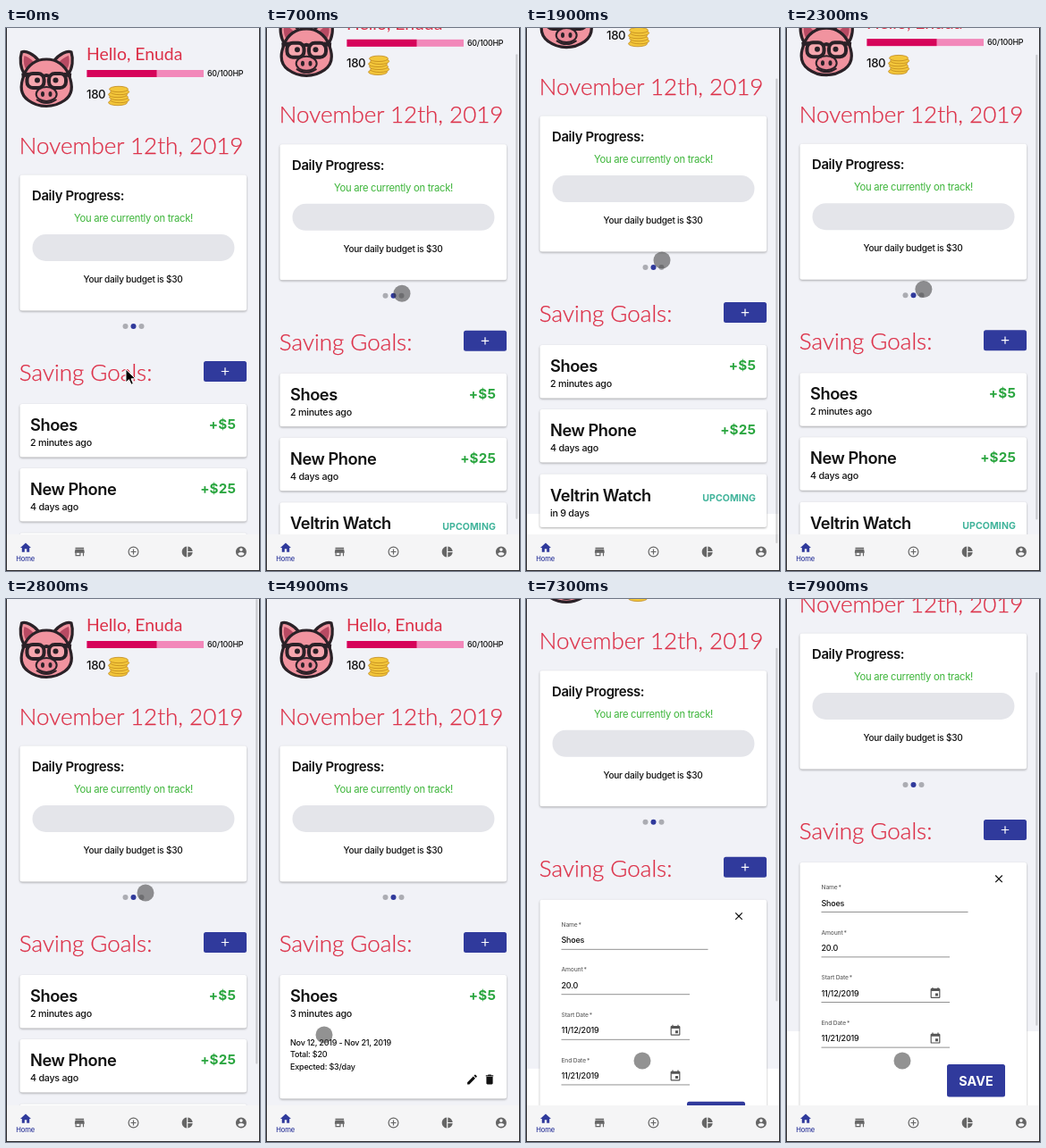
These frames come from a looping animation (284 px wide and 608 px high, 8000 ms). An HTML page:

```html
<!DOCTYPE html>
<html lang="en">
<head>
<meta charset="utf-8">
<title>Savings app</title>
<style>
  html, body { margin: 0; width: 284px; height: 608px; overflow: hidden; background: #fff; }
  svg { display: block; font-weight: 500; }
  text { font-family: Inter, Roboto, sans-serif; letter-spacing: -.025em; white-space: pre; }
  .lato { font-family: Lato, sans-serif; font-weight: 400; letter-spacing: 0; }
  .title { font-weight: 300; stroke: #dc3048; stroke-width: .25px; }
  .wide { letter-spacing: .01em; }
  .card { fill: #fff; filter: drop-shadow(0 1px 1px rgba(0, 0, 0, .32)); }
</style>
</head>
<body>
<svg id="stage" width="284" height="608" viewBox="0 0 284 608"></svg>
<script>
const INK = '#111', RED = '#dc3048', BLUE = '#303a9c', GREEN = '#2ba640', DARK = '#2a2127', PINK = '#f1939f';

const ICONS = {
  home: 'M10 20v-6h4v6h5v-8h3L12 3 2 12h3v8z',
  store: 'M20 4H4v2h16V4zm1 10v-2l-1-5H4l-1 5v2h1v6h10v-6h4v6h2v-6h1zm-9 4H6v-4h6v4z',
  addCircle: 'M13 7h-2v4H7v2h4v4h2v-4h4v-2h-4V7zm-1-5a10 10 0 1 0 0 20 10 10 0 0 0 0-20zm0 18a8 8 0 1 1 0-16 8 8 0 0 1 0 16z',
  pie: 'M11 2v20c-5.07-.5-9-4.79-9-10s3.93-9.5 9-10zm2.03 0v8.99H22c-.47-4.74-4.24-8.52-8.97-8.99zm0 11.01V22c4.74-.47 8.5-4.25 8.97-8.99z',
  person: 'M12 2a10 10 0 1 0 0 20 10 10 0 0 0 0-20zm0 3a3 3 0 1 1 0 6 3 3 0 0 1 0-6zm0 14.2c-2.5 0-4.71-1.28-6-3.22.03-1.99 4-3.08 6-3.08s5.97 1.09 6 3.08a7.2 7.2 0 0 1-6 3.22z',
  edit: 'M3 17.25V21h3.75L17.81 9.94l-3.75-3.75zM20.71 7.04a1 1 0 0 0 0-1.41l-2.34-2.34a1 1 0 0 0-1.41 0l-1.83 1.83 3.75 3.75z',
  trash: 'M6 19c0 1.1.9 2 2 2h8c1.1 0 2-.9 2-2V7H6zM19 4h-3.5l-1-1h-5l-1 1H5v2h14z',
  close: 'M19 6.41L17.59 5 12 10.59 6.41 5 5 6.41 10.59 12 5 17.59 6.41 19 12 13.41 17.59 19 19 17.59 13.41 12z',
  calendar: 'M17 12h-5v5h5zM16 1v2H8V1H6v2H5a2 2 0 0 0-2 2v14a2 2 0 0 0 2 2h14a2 2 0 0 0 2-2V5a2 2 0 0 0-2-2h-1V1zm3 18H5V8h14z',
  plus: 'M19 13h-6v6h-2v-6H5v-2h6V5h2v6h6z'
};

const text = (x, y, size, str, fill = INK, attrs = '') =>
  `<text x="${x}" y="${y}" font-size="${size}" fill="${fill}" ${attrs}>${str}</text>`;
const rect = (x, y, w, h, fill, attrs = '') =>
  `<rect x="${x}" y="${y}" width="${w}" height="${h}" fill="${fill}" ${attrs}/>`;
const icon = (name, cx, cy, fill, scale = .6) =>
  `<path d="${ICONS[name]}" fill="${fill}" transform="translate(${cx} ${cy}) scale(${scale}) translate(-12 -12)"/>`;
const card = (y, h, attrs = '') => `<rect class="card" x="15.5" y="${y}" width="253.5" height="${h}" rx="2.5" ${attrs}/>`;
const title = (y, str) => text(14.8, y, 26, str, RED, 'class="lato title"');
const MID = 'text-anchor="middle"', END = 'text-anchor="end"', BOLD = 'font-weight="600"';

function pig() {
  const both = s => s + `<g transform="translate(90.5) scale(-1 1)">${s}</g>`;
  const ear = `<path d="M37 37C31 29 22 25 17.5 27C15 35 16 45 21 52Z" fill="${PINK}" stroke="${DARK}" stroke-width="3.2"/>
    <path d="M20.5 31C19 37 20 43 23 47L31 38C27 34 24 32 20.5 31Z" fill="#b84a63"/>`;
  const side = `<rect x="23.5" y="51" width="19" height="16" rx="6.5" fill="#f5a6ae" stroke="${DARK}" stroke-width="4"/>
    <path d="M17.5 53L26 52" stroke="${DARK}" stroke-width="4.5"/>
    <circle cx="35" cy="58.5" r="3" fill="${DARK}"/>
    <ellipse cx="41" cy="74" rx="2" ry="3" fill="${DARK}"/>`;
  return both(ear) +
    `<path d="M45.2 35C33 35 24 42 20.5 52C15 65 16.5 75 25 81C31 85.5 38 87.5 45.2 87.5S59 85.5 65.5 81C74 75 75.5 65 70 52C66 42 57 35 45.2 35Z" fill="${PINK}" stroke="${DARK}" stroke-width="3.2"/>
    <path d="M34 80Q45.2 88 56.5 80" fill="#b84a63" stroke="${DARK}" stroke-width="2"/>
    <path d="M41 55Q45.2 51 49.5 55" fill="none" stroke="${DARK}" stroke-width="4"/>
    <ellipse cx="45.2" cy="74" rx="11.5" ry="8" fill="#e98796" stroke="${DARK}" stroke-width="2"/>` + both(side);
}

const coins = () => Array.from({ length: 6 }, (_, i) =>
  `<ellipse cx="${126 + [-1, 1.2, 0][i % 3]}" cy="${83.5 - i * 3}" rx="10.5" ry="3.2" fill="#f3c63a" stroke="#c08a1c" stroke-width=".8"/>`).join('');

const goal = (y, name, when, amount) => card(y, 59.5) +
  text(27, y + 30, 18.3, name, INK, BOLD) + text(27, y + 47, 10.75, when) + amount;
const gain = (y, str) => text(257, y, 15.2, str, GREEN, `class="wide" font-weight="700" ${END}`);

const field = (y, label, value, right, date) =>
  text(39.5, y, 6.7, label + '\u2009*', '#666') + text(39.5, y + 18.5, 9, value) +
  rect(39.5, y + 25, right - 39.5, .8, '#777') + (date ? icon('calendar', 167, y + 15.5, '#555') : '');

document.getElementById('stage').innerHTML = `
<g id="page">
  ${rect(0, -20, 284, 630, '#f1f2f7')}
  ${pig()}
  ${text(90, 36, 19.4, 'Hello, Enuda', RED, 'class="lato"')}
  ${rect(90.5, 47, 130.5, 8, '#f288ba')}${rect(90.5, 47, 78, 8, '#d6045a')}
  ${text(225, 54.3, 8.9, '60/100HP')}
  ${text(90, 78.5, 13.2, '180')}
  ${coins()}
  ${title(140.5, 'November 12th, 2019')}
  ${card(164.5, 152)}
  ${text(29, 193, 14.9, 'Daily Progress:', INK, BOLD)}
  ${text(142.5, 217.3, 11.25, 'You are currently on track!', '#3db53a', `font-weight="400" ${MID}`)}
  ${rect(29.5, 231, 226, 30, '#e4e5ea', 'rx="15"')}
  ${text(142, 285, 10.05, 'Your daily budget is $30', INK, MID)}
  ${[133.5, 142.5, 151.5].map((x, i) => `<circle cx="${x}" cy="334" r="3" fill="${i == 1 ? BLUE : '#abacb2'}"/>`).join('')}
  ${title(395, 'Saving Goals:')}
  ${rect(221, 373, 48, 23, BLUE, 'rx="2.5"')}${icon('plus', 245, 384.5, '#fff')}
  <g id="others">
    ${goal(493, 'New Phone', '4 days ago', gain(521, '+$25'))}
    ${goal(565.5, 'Veltrin Watch', 'in 9 days', text(257, 596, 10.5, 'UPCOMING', '#3fb39a', `class="wide" font-weight="700" ${END}`))}
  </g>
  ${card(421, 59.5, 'id="first"')}
  <svg id="clip" x="0" y="421" width="284" height="59.5" overflow="hidden">
    <g id="summary" transform="translate(0 -421)">
      ${text(27, 451, 18.3, 'Shoes', INK, BOLD)}
      ${text(27, 468, 10.75, '2 minutes ago', INK, 'id="age"')}
      ${gain(449, '+$5')}
      ${text(27, 499.5, 9.05, 'Nov 12, 2019 - Nov 21, 2019')}
      ${text(27, 513, 9.05, 'Total: $20')}
      ${text(27, 526.5, 9.05, 'Expected: $3/day')}
      ${icon('edit', 230.5, 538, INK)}${icon('trash', 250, 538, INK)}
    </g>
    <g id="form" transform="translate(0 -421)">
      ${icon('close', 238, 439.3, INK)}
      ${field(451, 'Name', 'Shoes', 203.5)}
      ${field(501.5, 'Amount', '20.0', 183)}
      ${field(552, 'Start Date', '11/12/2019', 183, true)}
      ${field(602.7, 'End Date', '11/21/2019', 183, true)}
      ${rect(180, 647, 65, 36.5, BLUE, 'rx="2.5"')}
      ${text(212.5, 670.5, 14.3, 'SAVE', '#fff', `class="wide" font-weight="700" ${MID}`)}
    </g>
  </svg>
</g>
${rect(0, 567, 284, 41, '#f5f5f6')}
${icon('home', 22, 582, BLUE)}${text(21.7, 597, 7.6, 'Home', BLUE, MID)}
${['store', 'addCircle', 'pie', 'person'].map((n, i) => icon(n, 82.3 + i * 60.2, 586.5, '#666')).join('')}
${rect(279.2, 0, 2.2, 100, '#000', 'id="bar" rx="1.1"')}
${rect(0, 0, 1, 608, '#2b2b2e')}${rect(283, 0, 1, 608, '#2b2b2e')}${rect(0, 607, 284, 1, '#2b2b2e')}
<g id="pointer">
  <path id="arrow" d="M0 0V15L3.5 11.7L6 17.3L8.4 16.3L6 10.8H10.8Z" fill="#000" stroke="#fff"/>
  <circle id="touch" r="9.5" fill="rgba(60,60,60,.56)"/>
</g>`;

// Keys are [time, value, ...]; values run linearly between them.
const SCROLL = [[500, 0], [1100, 102], [1400, 102], [1900, 66], [2750, 0], [6900, 0], [7200, 70], [7500, 112], [7750, 126]];
const POINTER = [[100, 134, 382], [400, 152, 330], [500, 152, 330], [1100, 152, 232], [1400, 152, 232], [1900, 152, 260],
  [2750, 156, 329], [2900, 156, 329], [3600, 65, 488], [5000, 65, 488], [5700, 231, 539], [6350, 231, 539], [6600, 130, 517]];
const BAR = [[450, 0], [550, 1], [3000, 1], [3400, 0], [6880, 0], [6980, 1]];

const clamp = v => Math.min(1, Math.max(0, v));
const smooth = v => v * v * (3 - 2 * v);
function at(keys, t) {
  const i = keys.findIndex(k => k[0] > t);
  if (i < 0) return keys[keys.length - 1].slice(1);
  if (i == 0) return keys[0].slice(1);
  const a = keys[i - 1], b = keys[i], p = (t - a[0]) / (b[0] - a[0]);
  return a.slice(1).map((v, j) => v + (b[j + 1] - v) * p);
}

const el = Object.fromEntries([...document.querySelectorAll('[id]')].map(e => [e.id, e]));
const show = (e, on) => e.setAttribute('visibility', on ? 'visible' : 'hidden');

function draw(t) {
  const [scroll] = at(SCROLL, t), [x, y] = at(POINTER, t);
  const editing = t >= 5900;
  const height = editing ? 290 : 59.5 + 79 * smooth(clamp((t - 4200) / 300));
  el.page.setAttribute('transform', `translate(0 ${-scroll})`);
  el.first.setAttribute('height', height);
  el.clip.setAttribute('height', height);
  el.others.setAttribute('transform', `translate(0 ${height - 59.5})`);
  el.age.textContent = (t < 4200 ? 2 : 3) + ' minutes ago';
  show(el.summary, !editing);
  show(el.form, editing);

  const total = editing ? 934 : 710;
  el.bar.setAttribute('y', scroll * 608 / total);
  el.bar.setAttribute('height', 608 * 608 / total);
  el.bar.setAttribute('opacity', .16 * at(BAR, t)[0]);

  el.pointer.setAttribute('transform', `translate(${x} ${y})`);
  show(el.arrow, t < 300);
  show(el.touch, t >= 300);
}

const start = performance.now();
function frame() {
  draw((performance.now() - start) % 8000);
  requestAnimationFrame(frame);
}
frame();
</script>
</body>
</html>
```
